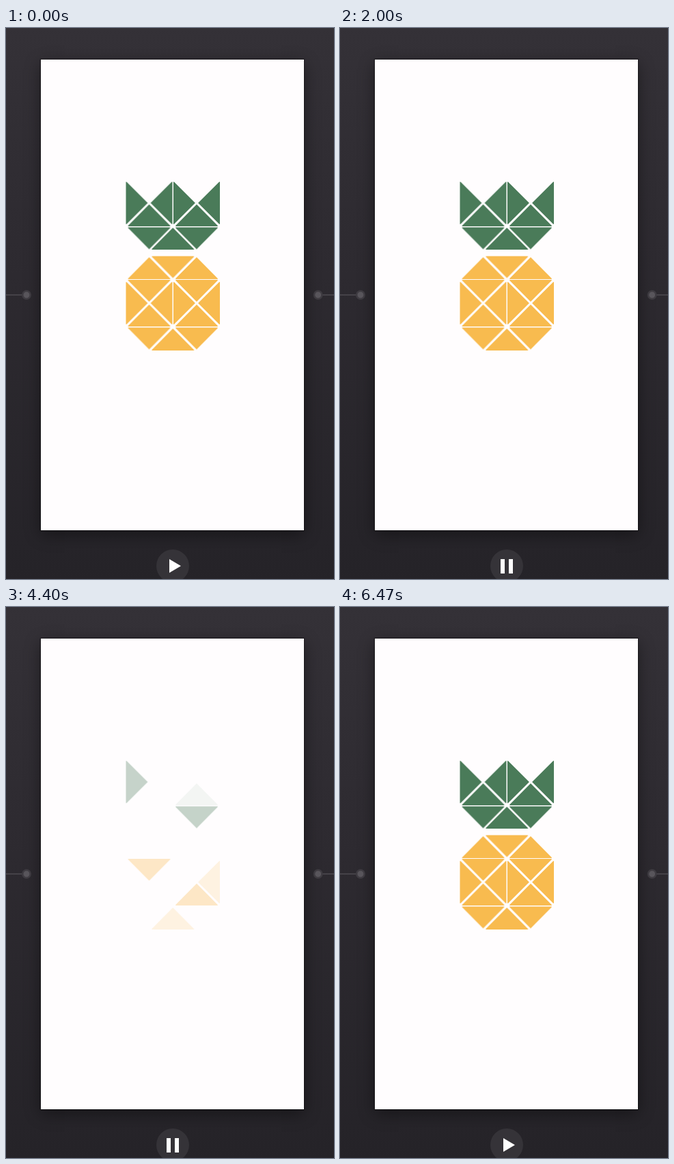
Write an HTML page that moves like this. It is 480 by 803 pixels and loops after 6.99 s.

```html
<!DOCTYPE html>
<html lang="en">
<head>
<meta charset="utf-8">
<title>Pineapple</title>
<style>
  html, body { margin: 0; width: 100%; height: 100%; overflow: hidden; }
  body { position: relative; background: linear-gradient(#343137, #2d2a30 45%, #252328); }
  .card {
    position: absolute; left: 51px; top: 46px; width: 385px; height: 686px;
    background: #fffdfe;
    box-shadow: 0 0 1px 1px rgba(0, 0, 0, .35), 0 6px 22px rgba(0, 0, 0, .42);
  }
  svg { position: absolute; left: 0; top: 0; display: block; }
</style>
</head>
<body>
<div class="card"></div>
<svg id="stage" width="480" height="803" viewBox="0 0 480 803">
  <path d="M0 389H24M463 389H480" stroke="#454248" stroke-width="2"/>
  <g fill="#58555b" stroke="#3e3b41" stroke-width="2.5">
    <circle cx="30" cy="389" r="5.7"/>
    <circle cx="456.7" cy="389" r="5.7"/>
  </g>
  <circle cx="244" cy="784" r="24" fill="#353338"/>
  <path id="play" d="M239 774L256 784L239 794Z" fill="#fff"/>
  <path id="pause" d="M235 774h6v21h-6zM247 774h6v21h-6z" fill="#fff" opacity="0"/>
  <g id="fruit" stroke-width="1.2" stroke-linejoin="round"></g>
</svg>
<script>
const LOOP = 6990;
const CLICKS = [600, 3670];
const PLAY_BACK = 1530;
const GREEN = '#4a7b59', YELLOW = '#f8bb4f';
const L = 209.5, M = 244.3, R = 279;

// Fade out start/end and fade in start/end, in ms after a click
const fades = {
  lead:  [50, 440, 570, 980],
  quick: [-30, 210, 640, 960],
  slow:  [-30, 400, 600, 1330],
  soft:  [-30, 290, 780, 1400],
  brisk: [-30, 250, 870, 1210],
  late:  [-30, 240, 1000, 1200],
  last:  [-30, 240, 1160, 1420]
};

// Quarter of a square: centre, side it touches, fade
const leaves = [
  [L, 255, 'left', 'lead'], [L, 255, 'right', 'last'], [L, 255, 'bottom', 'soft'],
  [R, 255, 'left', 'soft'], [R, 255, 'right', 'brisk'], [R, 255, 'bottom', 'slow'],
  [L, 324.5, 'top', 'soft'], [M, 289, 'bottom', 'brisk'], [R, 324.5, 'top', 'lead']
];
const body = [
  [L, 332, 'bottom', 'brisk'], [M, 366.5, 'top', 'soft'], [R, 332, 'bottom', 'late'],
  [L, 401, 'top', 'lead'], [L, 401, 'left', 'soft'],
  [L, 401, 'right', 'soft'], [L, 401, 'bottom', 'soft'],
  [R, 401, 'top', 'soft'], [R, 401, 'left', 'brisk'],
  [R, 401, 'right', 'quick'], [R, 401, 'bottom', 'lead'],
  [L, 470.5, 'top', 'soft'], [M, 436, 'bottom', 'quick'], [R, 470.5, 'top', 'brisk']
];
const turns = { top: 0, right: 90, bottom: 180, left: 270 };

const key = (time, opacity, easing = 'linear') => ({ offset: time / LOOP, opacity, easing });
const loop = (el, keys) => el.animate(keys, { duration: LOOP, iterations: Infinity });

function fadeKeys([outA, outB, inA, inB]) {
  const cycles = CLICKS.flatMap(t => [
    key(t + outA, 1, 'ease-in-out'), key(t + outB, 0),
    key(t + inA, 0, 'ease-in-out'), key(t + inB, 1)
  ]);
  return [key(0, 1), ...cycles, key(LOOP, 1)];
}

function switchKeys(idle) {
  const cycles = CLICKS.flatMap(t => [
    key(t, 1 - idle, 'step-end'), key(t + PLAY_BACK, idle, 'step-end')
  ]);
  return [key(0, idle, 'step-end'), ...cycles, key(LOOP, idle)];
}

function addTriangle(color, [x, y, side, fade]) {
  const tri = document.createElementNS('http://www.w3.org/2000/svg', 'path');
  tri.setAttribute('d', 'M-30.3 -33.3H30.3L0 -3Z');
  tri.setAttribute('transform', `translate(${x} ${y}) rotate(${turns[side]})`);
  tri.setAttribute('fill', color);
  tri.setAttribute('stroke', color);
  document.getElementById('fruit').append(tri);
  loop(tri, fadeKeys(fades[fade]));
}

leaves.forEach(t => addTriangle(GREEN, t));
body.forEach(t => addTriangle(YELLOW, t));
loop(document.getElementById('play'), switchKeys(1));
loop(document.getElementById('pause'), switchKeys(0));
</script>
</body>
</html>
```
